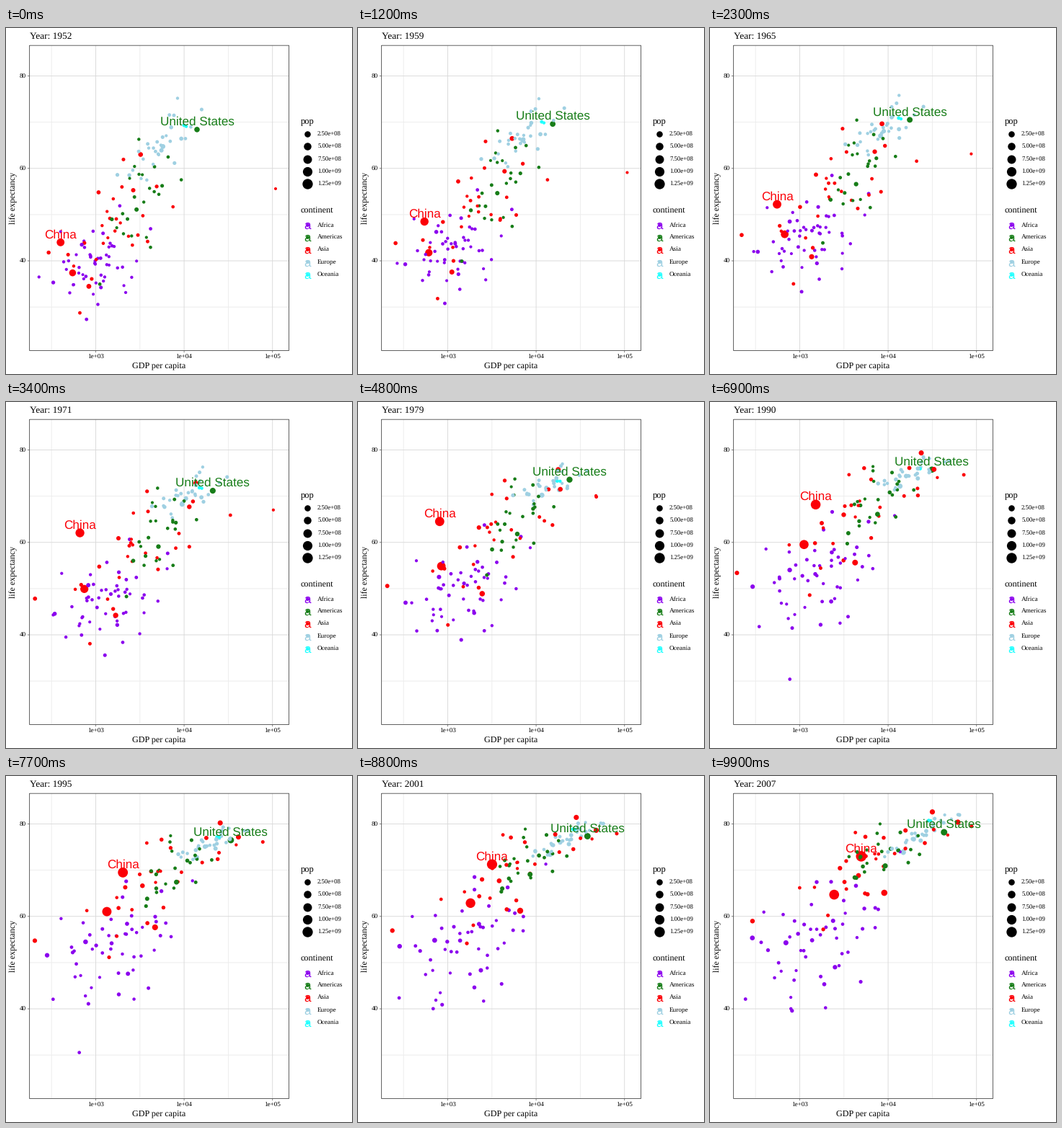
Recreate the animation shown at these times as a matplotlib script. Size 480 by 480 pixels, loop 10000 ms.

```python
import numpy as np
import matplotlib.pyplot as plt
from matplotlib.animation import FuncAnimation

STAGE, FRAMES, STEP = 480, 100, 9
YEARS = np.arange(1952, 2008, 5)
COLORS = {"Africa": "#8b00ee", "Americas": "#177d18", "Asia": "#fb0007",
          "Europe": "#9fd0e2", "Oceania": "#21ffff"}
GROWTH = {"Africa": 3.9, "Americas": 2.4, "Asia": 2.6, "Europe": 1.35, "Oceania": 2.1}
SERIF, SANS = "Liberation Serif", "Liberation Sans"

plt.rcParams["text.hinting"] = "none"
rng = np.random.default_rng(52)
tracks, colors = [], []


def px_x(log_gdp):
    return 124.5 + 122.6 * (log_gdp - 3)


def px_y(life):
    return 323 - 6.413 * (life - 40)


def diameter(pop):
    """Dot width in pixels for a population in millions."""
    return 3.9 + 10.67 * np.sqrt(pop / 1319)


def add(continent, pop, log_gdp, life):
    tracks.append([px_x(log_gdp), px_y(life), diameter(pop)])
    colors.append(COLORS[continent])


def country(continent, pop_ends, *keys):
    """One country through a few (year, GDP, life expectancy) points."""
    years, gdp, life = np.transpose(keys)
    add(continent, np.linspace(*pop_ends, len(YEARS)),
        np.interp(YEARS, years, np.log10(gdp)), np.interp(YEARS, years, life))


def curve(values):
    """Parabola through the values of 1952, 1977 and 2007."""
    return np.polyval(np.polyfit([0, 25, 55], values, 2), YEARS - 1952)


def spread(n):
    """Shuffled, evenly filled bell curve."""
    u = (rng.permutation(n) + 0.5) / n
    return np.log(u / (1 - u)) / 1.75


def drifting(n):
    """Bell-curve scores that slowly change rank over the years."""
    a, b = spread(n)[:, None], spread(n)[:, None]
    angle = np.linspace(0, 0.7, len(YEARS))
    return a * np.cos(angle) + b * np.sin(angle) + rng.normal(0, 0.05, (n, len(YEARS)))


def crowd(continent, n, pop, gdp, gdp_sd, life, slope, life_sd):
    """Countries around an average; life expectancy rises with log GDP by slope."""
    wealth = drifting(n) * curve(gdp_sd)
    ages = curve(life) + wealth * curve(slope) + drifting(n) * curve(life_sd)
    pops = pop * np.exp(np.clip(spread(n), -2, 2.2) * 1.1)
    for p, g, l in zip(pops, curve(gdp) + wealth, ages):
        add(continent, p * GROWTH[continent] ** np.linspace(-0.5, 0.5, len(YEARS)),
            g, np.minimum(l, 82))


# China, United States, India, Japan, Kuwait, Rwanda
country("Asia", (556, 1319), (1952, 400, 44), (1957, 576, 50.5), (1962, 488, 44.5),
        (1967, 613, 58.4), (1972, 677, 63.1), (1977, 741, 64), (1992, 1656, 68.7),
        (2007, 4959, 73))
country("Americas", (158, 301), (1952, 13990, 68.4), (1962, 16173, 70.2),
        (1972, 21806, 71.3), (1982, 25010, 74.7), (1987, 29884, 75),
        (1992, 32004, 76.1), (2007, 42952, 78.2))
country("Asia", (372, 1110), (1952, 547, 37.4), (1967, 701, 47.2), (1977, 813, 54.2),
        (1992, 1164, 60.2), (2007, 2452, 64.7))
country("Asia", (86, 127), (1952, 3217, 63), (1972, 14779, 73.4), (1987, 22376, 78.7),
        (2007, 31656, 82.6))
country("Asia", (0.2, 2.5), (1952, 108382, 55.6), (1957, 113523, 58), (1967, 80895, 64.6),
        (1972, 109348, 67.7), (1982, 31354, 71.3), (1997, 40301, 76.2), (2007, 47307, 77.6))
country("Africa", (2.5, 8.9), (1952, 493, 40), (1982, 882, 46.2), (1987, 848, 44),
        (1992, 737, 23.6), (1997, 590, 36.1), (2007, 863, 46.2))

crowd("Africa", 51, 5, [3.0, 3.18, 3.2], [0.24, 0.32, 0.4],
      [39.1, 49.5, 54.8], [4, 7, 9], [4.4, 5, 7])
crowd("Americas", 24, 7, [3.5, 3.77, 3.91], [0.21, 0.2, 0.26],
      [53, 64.2, 73.4], [25, 22, 9], [6, 4.5, 2.8])
crowd("Asia", 28, 14, [3.18, 3.52, 3.78], [0.31, 0.46, 0.48],
      [46.5, 60, 70.8], [12, 11, 10], [6, 5.5, 4])
crowd("Europe", 30, 10, [3.72, 4.12, 4.37], [0.21, 0.19, 0.22],
      [64.7, 72, 77.7], [18, 9, 11], [2.8, 1.8, 1])
crowd("Oceania", 2, 7, [4.01, 4.24, 4.47], [0.02, 0.04, 0.1],
      [69.2, 72.9, 80.7], [0, 8, 7], [0.2, 0.2, 0.1])

# labelled countries stay first, the rest overlap in mixed order
order = np.r_[0:6, 6 + rng.permutation(len(tracks) - 6)]
paths = np.array(tracks)[order].transpose(2, 0, 1)  # keyframe, country, (x, y, size)
colors = [colors[i] for i in order]

fig = plt.figure(figsize=(STAGE / 72, STAGE / 72), dpi=72, facecolor="white")
ax = fig.add_axes([0, 0, 1, 1])
ax.set(xlim=(0, STAGE), ylim=(STAGE, 0))
ax.axis("off")


def label(x, y, s, size, family=SERIF, **kw):
    return ax.text(x, y, s, fontsize=size, family=family,
                   va=kw.pop("va", "baseline"), **kw)


def line(x, y, color, width=0.9, z=1):
    ax.plot(x, y, color=color, lw=width, zorder=z, snap=False, solid_capstyle="butt")


def dots(x, y, d, color, z):
    return ax.scatter(x, y, s=np.square(d), c=color, linewidths=0, zorder=z)


L, R, T, B = 32.6, 392.5, 24.2, 447.5
MINOR, MAJOR, TICK = "#ececec", "#d9d9d9", "#777777"
for power, age in zip((2.5, 3.5, 4.5), (30, 50, 70)):
    line([px_x(power)] * 2, [T, B], MINOR)
    line([L, R], [px_y(age)] * 2, MINOR)
for power, age in zip((3, 4, 5), (40, 60, 80)):
    x, y = px_x(power), px_y(age)
    line([x, x], [T, B], MAJOR)
    line([L, R], [y, y], MAJOR)
    line([x, x], [B, B + 2.75], TICK)
    line([L - 2.75, L], [y, y], TICK)
    label(x, 459, f"1e+0{power}", 9.1, ha="center")
    label(27.5, y + 3, str(age), 9.1, ha="right")
line([L, R, R, L, L], [T, T, B, B, T], "#505050", z=4)

label(212.5, 472, "GDP per capita", 12.1, ha="center")
label(10.8, 235.5, "life expectancy", 11.9, ha="center", va="center", rotation=90)

label(409, 132.5, "pop", 12.5)
for i, pop in enumerate((250, 500, 750, 1000, 1250)):
    y = 147 + 17.28 * i
    dots([418], [y], diameter(pop), "black", 2)
    label(432, y + 3, f"{pop * 1e6:.2e}", 8.8)
label(409, 256.5, "continent", 12.3)
for i, (name, color) in enumerate(COLORS.items()):
    y = 272.5 + 17.28 * i
    dots([418], [y], 4.8, color, 2)
    label(418, y + 6, "a", 17.07, SANS, color=color, ha="center")
    label(432, y + 3, name, 9.3)

title = label(32.6, 15, "", 13.4)
cloud = dots(paths[0, :, 0], paths[0, :, 1], paths[0, :, 2], colors, 3)
tags = [label(0, 0, name, 17.07, SANS, color=colors[i], ha="center", zorder=5)
        for i, name in enumerate(("China", "United States"))]


def update(frame):
    k = min(frame // STEP, len(YEARS) - 2)
    t = frame / STEP - k
    now = paths[k] * (1 - t) + paths[k + 1] * t
    cloud.set_offsets(now[:, :2])
    cloud.set_sizes(now[:, 2] ** 2)
    for tag, (x, y, _) in zip(tags, now):
        tag.set_position((x, y - 6))
    title.set_text(f"Year: {round(1952 + frame * 5 / STEP)}")
    return [cloud, title, *tags]


anim = FuncAnimation(fig, update, frames=FRAMES, interval=100, repeat=True, repeat_delay=0)
plt.show()
```
